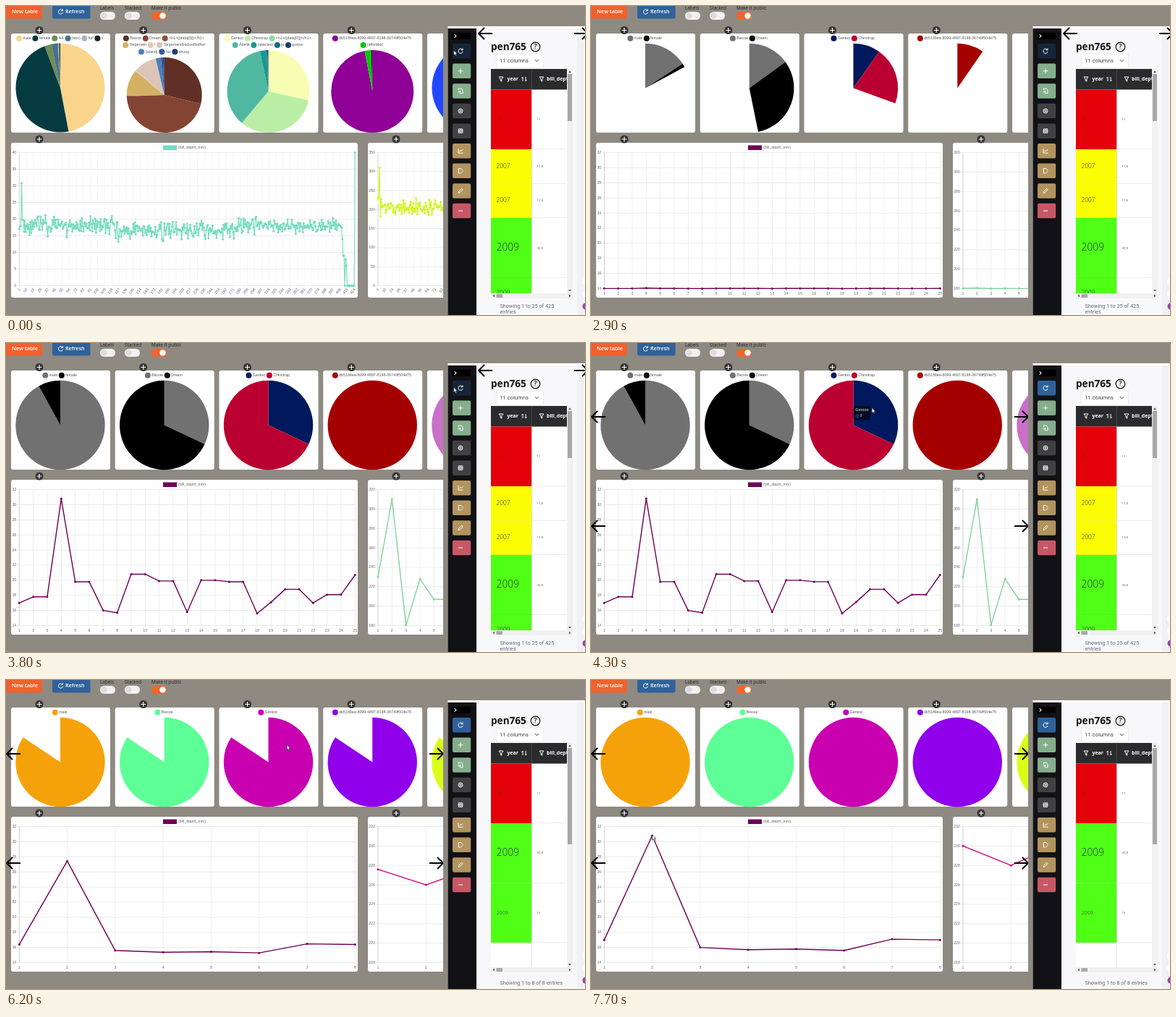
Animation, 800 px wide and 427 px high, one loop 8 s. Source, as an HTML page with a canvas:

```html
<!DOCTYPE html>
<html lang="en">
<head>
<meta charset="utf-8">
<title>Dashboard</title>
<style>
  html, body { margin: 0; width: 100%; height: 100%; overflow: hidden; background: #8e8a82; }
  canvas { display: block; }
</style>
</head>
<body>
<canvas id="stage" width="800" height="427"></canvas>
<script>
const LOOP = 8000;
const g = document.getElementById('stage').getContext('2d');
const UI = '"Open Sans", sans-serif', CHART = '"Liberation Sans", sans-serif', FORM = 'Roboto, sans-serif';
const ID = 'db5189ea-8099-4897-8198-36749f504e75';

const clamp = v => Math.max(0, Math.min(1, v));
const outQuart = v => 1 - (1 - clamp(v)) ** 4;
const inOut = v => (v = clamp(v)) * v * (3 - 2 * v);

// Seeded noise for the dense series
let seed = 11;
const random = () => (seed = (seed * 16807) % 2147483647) / 2147483647;
const noise = spread => (random() + random() - 1) * spread;
const depth = Array.from({ length: 425 }, (_, i) =>
  (i < 120 ? 18 : i < 275 ? 16.6 : 18) + noise(i < 300 ? 3.5 : 2.7));
depth.splice(0, 6, 17, 17.8, 17.8, 30.8, 19.8, 19.8);
depth.splice(408, 17, 14, 9, 9, 0, 8, 6, ...Array(10).fill(0), 40);
const flipper = Array.from({ length: 90 }, () => 208 + noise(24));
flipper.splice(0, 6, 230, 230, 310, 181, 228, 207);

// Each slice is [colour, end of slice as a share of the circle]
const scenes = [
  {
    start: -LOOP, lag: [],
    pies: [
      { cy: 113, r: 61.5, rows: ['male,female,NA,(sex),ftzf,x'],
        slices: [['#f9d58c', .47], ['#053a40', .943], ['#728b52', .968], ['#48718a', .992], ['#a9b3c4', .996], ['#222', 1]] },
      { cy: 123, r: 52, rows: ['Biscoe,Dream,<h1>{{data[0]}}</h1>', 'Torgersen,!,Torgersendxsdsxdfsdfsd', '(island),hui,vbuvg'],
        slices: [['#603026', .288], ['#844434', .745], ['#8a5038', .747], ['#d3b164', .86], ['#e0c9b8', .863], ['#dcc5b8', .963],
          ['#4f7fb5', .985], ['#3558a8', .994], ['#263a78', 1]] },
      { cy: 118, r: 57, rows: ['Gentoo,Chinstrap,<h1>{{data[0]}}</h1>', 'Adelie,(species),jo,gvztuv'],
        slices: [['#f7fdb2', .285], ['#baeea4', .61], ['#8adb9f', .612], ['#50b8a0', .967], ['#159b92', .993], ['#166a80', .996], ['#243d66', 1]] },
      { cy: 118, r: 57, rows: [ID, '(idfsrbbb)'], slices: [['#8e0096', .97], ['#0ac80c', .995], ['#111', 1]] },
      { cy: 113, r: 61.5, rows: [], slices: [['#2148ff', 1]] }
    ],
    lines: [{ lo: 0, hi: 40, tick: 5, color: '#72dcbb', data: depth }, { lo: 0, hi: 350, tick: 50, color: '#d2f51c', data: flipper }],
    count: 425,
    rows: [['#e4020a', 82.5, '-3', 6, '17'], ['#fbfd04', 47.5, '2007', 8.4, '17,8'], ['#fbfd04', 47.5, '2007', 8.4, '17,8'],
      ['#50ff16', 83, '2009', 13.8, '30,8'], ['#50ff16', 42, '2009', 8.4, '']],
    thumb: 65, footer: ['Showing 1 to 25 of 425', 'entries']
  },
  {
    start: 2900, lag: [45, 145, 86, 24, 45],
    pies: [
      { slices: [['#717171', .92], ['#000', 1]], rows: ['male,female'] },
      { slices: [['#717171', .32], ['#000', 1]], rows: ['Biscoe,Dream'] },
      { slices: [['#00195c', .32], ['#ba0030', 1]], rows: ['Gentoo,Chinstrap'] },
      { slices: [['#a50000', 1]], rows: [ID] },
      { slices: [['#c970c9', 1]], rows: [] }
    ],
    lines: [
      { lo: 14, hi: 32, tick: 2, color: '#700058', data: [17, 17.8, 17.8, 30.8, 19.8, 19.8, 16, 15.7, 20.8, 20.8, 19.9, 19.9, 15.8,
        20, 20, 19.8, 19.8, 15.6, 17.1, 18.8, 18.8, 17, 18.1, 18.1, 20.7] },
      { lo: 180, hi: 320, tick: 20, color: '#82d49b', data: [230, 310, 180.5, 228, 207, 207] }
    ],
    count: 25
  },
  {
    start: 5870, lag: [40, 40, 40, 40, 40],
    pies: [
      { slices: [['#f5a20a', 1]], rows: ['male'] },
      { slices: [['#5eff96', 1]], rows: ['Biscoe'] },
      { slices: [['#c800b0', 1]], rows: ['Gentoo'] },
      { slices: [['#9000ea', 1]], rows: [ID] },
      { slices: [['#d9ff18', 1]], rows: [] }
    ],
    lines: [
      { lo: 14, hi: 32, tick: 2, color: '#700058', data: [17, 30.8, 16, 15.7, 15.8, 15.6, 17.1, 17] },
      { lo: 218, hi: 232, tick: 2, color: '#cc007e', data: [230, 228, 230.2] }
    ],
    count: 8,
    rows: [['#e4020a', 82.5, '-3', 6, '17'], ['#50ff16', 82.5, '2009', 13.8, '30,8'], ['#50ff16', 82.5, '2009', 7.2, '16']],
    thumb: 133, footer: ['', 'Showing 1 to 8 of 8 entries']
  }
];
scenes[1] = { ...scenes[0], ...scenes[1] };

function box(x, y, w, h, color, r = 0) {
  g.fillStyle = color;
  g.beginPath();
  g.roundRect(x, y, w, h, r);
  g.fill();
}

function disc(x, y, r, color) {
  g.fillStyle = color;
  g.beginPath();
  g.arc(x, y, r, 0, 7);
  g.fill();
}

function text(s, x, y, size, color, family = UI, weight = 400, align = 'left') {
  g.font = `${weight} ${size}px ${family}`;
  g.textAlign = align;
  g.textBaseline = 'middle';
  g.fillStyle = color;
  g.fillText(s, x, y);
}

function icon(path, x, y, color = '#fff', width = 1) {
  g.save();
  g.translate(x, y);
  g.strokeStyle = color;
  g.lineWidth = width;
  g.stroke(new Path2D(path));
  g.restore();
}

function clipped(x, y, w, h, draw) {
  g.save();
  g.beginPath();
  g.rect(x, y, w, h);
  g.clip();
  draw();
  g.restore();
}

const ICON = {
  refresh: 'M2.6 -1.8A3.1 3.1 0 1 0 3.1 .8M3 -3.6V-1.3H.7',
  plus: 'M-3.3 0H3.3M0 -3.3V3.3',
  file: 'M-2.5 -1V-3.4H1L3 -1.4V3.4H-.5M-3.5 1.2H0M-1.5 -.5L.2 1.2L-1.5 3',
  gear: 'M3 0A3 3 0 1 1 -3 0A3 3 0 1 1 3 0M1.2 0A1.2 1.2 0 1 1 -1.2 0A1.2 1.2 0 1 1 1.2 0',
  chip: 'M-2.7 -2.7H2.7V2.7H-2.7ZM-1.2 -1.2H1.2V1.2H-1.2ZM-3.5 0H-2.7M2.7 0H3.5',
  graph: 'M-3 -3V3H3.5M-1.5 1L0 -.7L1.2 .3L3.2 -2',
  page: 'M3 -.5V-1L.8 -3.2H-2.7V3.2H.5M1 2.8L3.4 .5',
  pencil: 'M-3 3L-2.5 .9L1.7 -3.2L3.2 -1.7L-.9 2.5Z',
  minus: 'M-3 0H3',
  filter: 'M-3 -3H3L.8 0V3.2L-.8 2.2V0Z',
  sort: 'M-2 3V-3L-3.5 -1.2M2 -3V3L3.5 1.2',
  left: 'M10 0H-9M-1 -8L-9 0L-1 8',
  right: 'M-10 0H9M1 -8L9 0L1 8'
};

function plusBadge(x, y) {
  disc(x, y, 5.5, '#333');
  icon(ICON.plus, x, y, '#fff', 1.2);
}

function legend(cx, rows, slices) {
  let n = 0;
  rows.forEach((row, r) => {
    const names = row.split(',');
    g.font = `5.3px ${CHART}`;
    const widths = names.map(s => g.measureText(s).width + 11);
    let x = cx - widths.reduce((a, b) => a + b) / 2;
    names.forEach((name, i) => {
      const y = 44.7 + r * 9.3;
      disc(x + 4, y, 4, slices[n++][0]);
      text(name, x + 9.3, y, 5.3, '#555', CHART);
      x += widths[i];
    });
  });
}

function pie(cx, { cy = 113.5, r = 61.7, rows, slices }, p) {
  legend(cx, rows, slices);
  let from = 0;
  for (const [color, to] of slices) {
    const angle = v => v * p * Math.PI * 2 - Math.PI / 2;
    g.fillStyle = color;
    g.beginPath();
    g.moveTo(cx, cy);
    g.arc(cx, cy, r, angle(from), angle(to));
    g.fill();
    from = to;
  }
}

function lineChart(x0, { lo, hi, tick, color, data }, count, p) {
  const dense = count > 100, top = 202.5, bottom = dense ? 386.5 : 390.5;
  const step = 464 / (count - 1), stride = dense ? 9 : 1;
  const px = i => x0 + i * step;
  const py = v => bottom - (v - lo) / (hi - lo) * (bottom - top);
  for (let v = lo; v <= hi; v += tick) {
    box(x0 - 3, py(v) - .3, 467, .7, '#e3e3e3');
    text(v, x0 - 4, py(v), 5.3, '#666', CHART, 400, 'right');
  }
  for (let i = 0; i < count; i += stride) {
    box(px(i) - .3, top, .6, bottom - top + 3, dense ? '#eee' : '#e3e3e3');
    g.save();
    g.translate(px(i), dense ? bottom + 5 : 398);
    if (dense) g.rotate(-.9);
    text(i + 1, dense ? 1 : 0, 0, 5.3, '#666', CHART, 400, dense ? 'right' : 'center');
    g.restore();
  }
  box(x0 - .4, top, .8, bottom - top, '#ccc');
  g.strokeStyle = color;
  g.lineWidth = dense ? 1.1 : 1.4;
  g.lineJoin = 'round';
  g.beginPath();
  const points = data.map((v, i) => [px(i), bottom - (bottom - py(v)) * p]);
  points.forEach(q => g.lineTo(...q));
  g.stroke();
  points.forEach(q => disc(...q, 1.5, color));
}

function toolbar() {
  const toggle = (label, x, on) => {
    text(label, x, 3, 6.4, '#222');
    box(x, 8, 21, 11, on ? '#f4652c' : '#f1f1f1', 5.5);
    disc(x + (on ? 15.5 : 5.5), 13.5, 4.2, on ? '#fff' : '#ddd');
  };
  box(-4, -4, 54, 21.5, '#f0612d', 2);
  text('New table', 8, 8, 7.4, '#fff', UI, 600);
  box(64, -4, 52.5, 21.5, '#2f629a', 2);
  icon(ICON.refresh, 75.5, 8);
  text('Refresh', 82, 8, 7.2, '#fff', UI, 600);
  toggle('Labels', 130, false);
  toggle('Stacked', 164, false);
  toggle('Make it public', 201, true);
}

function dashboard(scene, t, hovered) {
  for (let i = 0; i < 5; i++) {
    box(7 + i * 143.75, 38, 137, 137, '#fff', 3);
    pie(75 + i * 143.75, scene.pies[i], outQuart((t - scene.start + (scene.lag[i] || 0)) / 1000));
    if (i < 4) plusBadge(46 + i * 143.75, 33.5);
  }
  const p = outQuart((t - scene.start) / 1000);
  [[7, 479], [500, 479]].forEach(([x, w], i) => {
    box(x, 189, w, 214, '#fff', 3);
    plusBadge(x + 39, 184);
    lineChart(x + (i ? 14 : 11.3), scene.lines[i], scene.count, p);
  });
  box(217, 192.5, 19, 6.5, scene.lines[0].color);
  text('(bill_depth_mm)', 238, 195.7, 5.3, '#666', CHART);
  if (hovered) for (const y of [102, 253]) {
    icon(ICON.left, 10, y, '#000', 2);
    icon(ICON.right, 595, y, '#000', 2);
  }
}

function sidebar(refreshHovered) {
  box(610.5, 31, 39.5, 400, '#121115');
  box(616, 37, 26, 9, '#000');
  icon('M-1.3 -2.2L1 0L-1.3 2.2', 621, 41.5, '#fff', 1.1);
  const buttons = [
    ['refresh', refreshHovered ? '#16263a' : '#2f629a'], ['plus', '#85ae8c'], ['file', '#85ae8c'], ['gear', '#414143'], ['chip', '#414143'],
    ['graph', '#b2945f'], ['page', '#b2945f'], ['pencil', '#b2945f'], ['minus', '#c65866']
  ];
  buttons.forEach(([name, color], i) => {
    box(617, 52 + i * 27.6, 25.2, 20.5, color, 2);
    icon(ICON[name], 628, 62.2 + i * 27.6);
  });
}

function table({ rows, thumb }, shift) {
  box(670, 87, 105, 310, '#fff');
  box(670, 87, 105, 28.5, '#2b2b2e');
  box(726.3, 87, .7, 28.5, '#555');
  icon(ICON.filter, 684, 101);
  text('year', 692.5, 101, 7, '#fff', UI, 700);
  icon(ICON.sort, 716, 101);
  icon(ICON.filter, 740, 101);
  text('bill_depth_mm', 747, 101, 7, '#fff', UI, 700);
  let y = 115.5;
  for (const [color, h, year, size, value] of rows) {
    box(670, y, 56.5, h, color);
    box(670, y + h - .5, 105, .6, 'rgba(120,120,120,.3)');
    text(year, 677.5, y + h / 2, size, '#263646', UI, 300);
    text(value, 733.5, y + h / 2, 4.3, '#555');
    y += h;
  }
  box(726.3, 115.5, .7, 282, '#ddd');
}

function scrollbars(thumb) {
  box(775, 87, 8, 310, '#f1f1f1');
  box(776, 94, 6, thumb, '#a8a8a8');
  box(670, 397, 113, 7, '#f1f1f1');
  box(677.5, 398, 8.5, 5, '#a8a8a8');
  g.fillStyle = '#555';
  g.fill(new Path2D('M675 398.5V402.5L672.5 400.5ZM778 398.5V402.5L780.5 400.5ZM777 92H781L779 89.5ZM777 392H781L779 394.5Z'));
}

function panel(scene, t, loading, hovered) {
  const shift = loading ? 2.7 : 0;
  box(610.5, 28, 190, 400, '#fff');
  box(650, 31, 150, 400, '#f8f8fa');
  box(789, 31, 9, 400, '#f1f1f4');
  g.save();
  g.translate(0, shift);
  sidebar(!hovered);
  g.restore();
  if (loading) {
    box(610.5, 30, 190, 3.5, '#fff');
    box(508 + (t - 5700), 31, 190, 2.5, '#f4652c');
  }
  g.save();
  g.translate(0, shift);
  text('pen765', 670, 57.5 - shift / 2, 13.6, '#111', UI, 700);
  icon('M6.3 0A6.3 6.3 0 1 1 -6.3 0A6.3 6.3 0 1 1 6.3 0', 731.5, 56.5, '#111', 1.2);
  text('?', 731.5, 56.8, 9.5, '#111', UI, 600, 'center');
  box(677, 66, 66, 19.5, '#ddd', 2);
  box(677.5, 66.5, 65, 18.5, '#fff', 2);
  text('11 columns', 682, 75.8, 7.7, '#444', FORM);
  icon('M-2.5 -1.2L0 1.3L2.5 -1.2', 733.5, 75.5, '#333');
  clipped(670, 87, 105, 310, () => table(scene));
  scrollbars(scene.thumb);
  scene.footer.forEach((line, i) => text(line, 682.5, (scene.footer[0] ? 415 : 411.5) + i * 7.5, 7.3, '#667', FORM));
  g.restore();
  if (!hovered) {
    icon(ICON.left, 662, 38, '#000', 2);
    icon(ICON.right, 795, 38, '#000', 2);
  }
  disc(801, 381, 5, '#fff');
  disc(801, 398, 5, '#fff');
  disc(801, 415, 4.5, '#a13cb4');
}

function tooltip(alpha) {
  g.globalAlpha = alpha;
  box(362.5, 87, 23.5, 19.5, '#060608', 2.5);
  text('Gentoo', 365.3, 92.5, 5.3, '#fff', CHART, 700);
  box(365.5, 98.5, 5, 5, '#223a8a');
  text('8', 371.5, 101, 5.3, '#fff', CHART);
  g.globalAlpha = 1;
}

function cursor(x, y) {
  const arrow = new Path2D('M0 0V7.2L1.7 5.7L2.9 8.2L4.1 7.6L3 5.2H5.2Z');
  g.save();
  g.translate(x, y);
  g.fillStyle = '#fff';
  g.fill(arrow);
  g.restore();
  icon('M0 0V7.2L1.7 5.7L2.9 8.2L4.1 7.6L3 5.2H5.2Z', x, y, '#111', .7);
}

function draw() {
  const t = performance.now() % LOOP;
  const scene = scenes[t < 2900 ? 0 : t < 6000 ? 1 : 2];
  const hovered = t >= 3950, loading = t >= 5700 && t < 6000;
  box(0, 0, 800, 427, '#8e8a82');
  toolbar();
  clipped(0, 20, 604, 407, () => dashboard(scene, t, hovered));
  panel(scene, t, loading, hovered);
  if (t >= 4200 && t < 6000) tooltip(.55 + .4 * clamp((t - 4200) / 300));
  if (t < 1600 || t >= 3800) {
    const enter = inOut((t - 3800) / 500), leave = inOut((t - 6700) / 800);
    cursor(618.5 - 230.5 * enter - 303.5 * leave, 61 + 28.5 * enter + 124.5 * leave);
  }
  requestAnimationFrame(draw);
}
draw();
</script>
</body>
</html>
```
